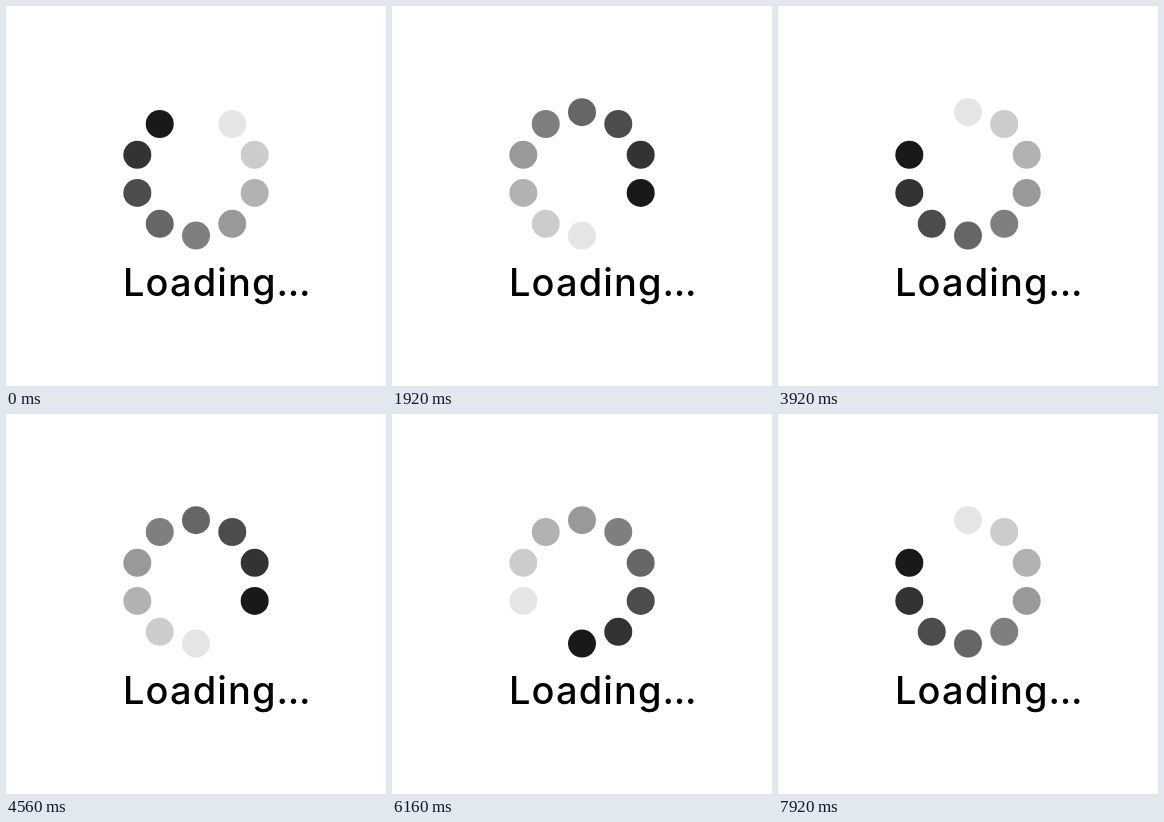
Recreate the animation shown at these times as an HTML page. Size 380x380 px, loop 8000 ms.

```html
<!DOCTYPE html>
<html lang="en">
<head>
<meta charset="utf-8">
<title>Loading</title>
<style>
  html, body { margin: 0; width: 100%; height: 100%; overflow: hidden; background: #fff; }
  svg { display: block; width: 100vw; height: 100vh; }
  text { font: 500 38px Inter, "Noto Sans", sans-serif; letter-spacing: 1.1px; }
  .dots { letter-spacing: -0.3px; }
</style>
</head>
<body>
<svg viewBox="0 0 380 380">
  <g id="ring"></g>
  <text x="117" y="290">Loading<tspan class="dots">...</tspan></text>
</svg>
<script>
  const LOOP = 8000, TICK = 80, DOTS = 10, STEPS = 60;
  const CX = 190, CY = 167.9, RADIUS = 61.7, DOT = 14;
  const ring = document.getElementById('ring');

  const dots = Array.from({ length: DOTS }, (_, i) => {
    const angle = i / DOTS * 2 * Math.PI;
    const dot = document.createElementNS('http://www.w3.org/2000/svg', 'circle');
    dot.setAttribute('cx', CX + RADIUS * Math.sin(angle));
    dot.setAttribute('cy', CY - RADIUS * Math.cos(angle));
    dot.setAttribute('r', DOT);
    ring.appendChild(dot);
    return dot;
  });

  // The empty place moves clockwise; dots darken from there round the ring.
  function draw(ms) {
    const tick = Math.floor((ms % LOOP) / TICK);
    const gap = Math.floor(tick * STEPS * TICK / LOOP);
    dots.forEach((dot, i) => {
      const level = (i - gap % DOTS + DOTS) % DOTS;
      dot.setAttribute('fill-opacity', level / DOTS);
    });
  }

  const start = performance.now();
  function frame() {
    draw(performance.now() - start);
    requestAnimationFrame(frame);
  }
  draw(0);
  requestAnimationFrame(frame);
</script>
</body>
</html>
```
